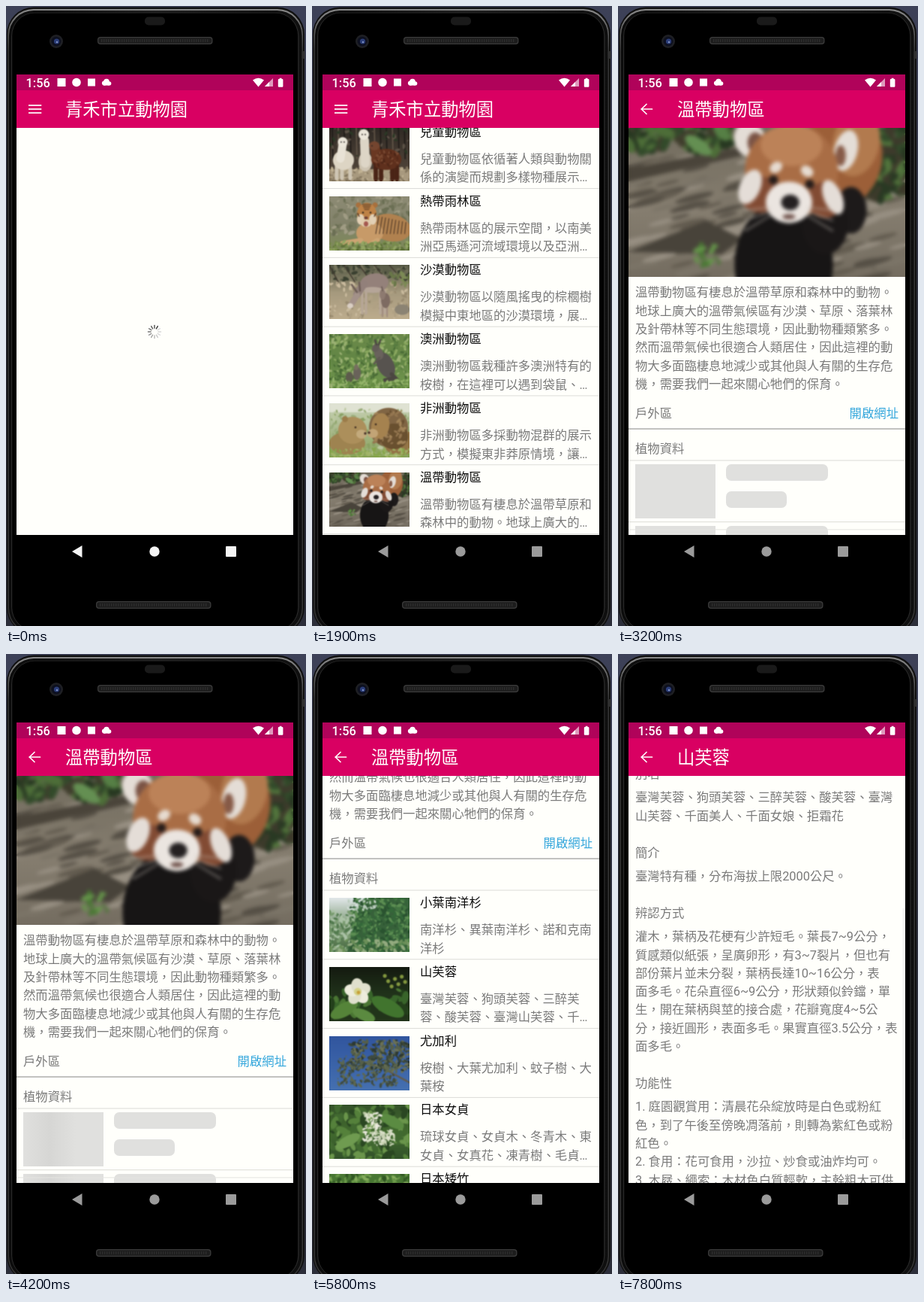
An HTML page with a canvas that plays this animation: 400 px wide and 824 px high, repeating every 7.9 s.

```html
<!DOCTYPE html>
<html lang="zh-Hant">
<head>
<meta charset="utf-8">
<style>
html, body { margin: 0; width: 100%; height: 100%; overflow: hidden; background: #000; }
canvas { display: block; width: 400px; height: 824px; }
</style>
</head>
<body>
<canvas id="stage"></canvas>
<script>
const W = 400, H = 824, LOOP = 7900, STEP = 100;
const FONT = 'Roboto, "Noto Sans CJK TC", "Noto Sans CJK", sans-serif';
const TOP = 162, BOTTOM = 703, LEFT = 14, RIGHT = 383;
const ROW = 91.8, SIZE = 16.35, LINE = 24.3;
const PAPER = '#fffffb', GREY = '#7a7a7a';

const stage = document.getElementById('stage');
const dpr = window.devicePixelRatio || 1;
stage.width = W * dpr;
stage.height = H * dpr;
const screen = stage.getContext('2d');
let g = screen;

// ---------- drawing helpers ----------
function rect(color, x, y, w, h) { g.fillStyle = color; g.fillRect(x, y, w, h); }
function round(color, x, y, w, h, r) {
  g.fillStyle = color;
  g.beginPath();
  g.roundRect(x, y, w, h, r);
  g.fill();
}
function oval(color, x, y, rx, ry = rx, turn = 0) {
  g.fillStyle = color;
  g.beginPath();
  g.ellipse(x, y, rx, ry, turn, 0, 7);
  g.fill();
}
function poly(color, ...p) {
  g.fillStyle = color;
  g.beginPath();
  for (let i = 0; i < p.length; i += 2) g.lineTo(p[i], p[i + 1]);
  g.fill();
}
function line(color, width, ...p) {
  g.strokeStyle = color;
  g.lineWidth = width;
  g.lineCap = 'round';
  g.beginPath();
  for (let i = 0; i < p.length; i += 2) g.lineTo(p[i], p[i + 1]);
  g.stroke();
}
function fade(x0, y0, x1, y1, ...colors) {
  const f = g.createLinearGradient(x0, y0, x1, y1);
  colors.forEach((c, i) => f.addColorStop(i / (colors.length - 1), c));
  return f;
}
// y is the middle of the glyph row
function text(s, x, y, color = GREY, size = SIZE, weight = 400, align = 'left') {
  g.font = `${weight} ${size}px ${FONT}`;
  g.fillStyle = color;
  g.textAlign = align;
  g.textBaseline = 'alphabetic';
  g.fillText(s, x, y + size * 0.37);
}

// ---------- pictures, 107 x 72 units ----------
const PW = 107, PH = 72;
function speckle(seed, n, colors, x, y, w, h, size, tilt = null) {
  let s = seed * 7919 + 17;
  const rnd = () => (s = (s * 16807) % 2147483647) / 2147483647;
  for (let i = 0; i < n; i++) {
    const px = x + rnd() * w, py = y + rnd() * h, r = size * (0.5 + rnd());
    const turn = rnd() * 3;
    oval(colors[i % colors.length], px, py, r, r * (tilt === null ? 0.5 : 0.16), tilt ?? turn);
  }
}
const back = (...colors) => rect(fade(0, 0, 0, PH, ...colors), 0, 0, PW, PH);
function legs(color, width, y0, y1, ...xs) { xs.forEach(x => line(color, width, x, y0, x, y1)); }

const photos = {
  monkeys() {
    back('#4b6240', '#576e4a', '#71894f');
    speckle(1, 220, ['#38502f', '#708a58', '#5d5d66', '#485f3c'], 0, 0, PW, 60, 3);
    speckle(26, 40, ['#8fa671', '#7d9760'], 50, 0, 57, 24, 3);
    poly('#2d2e33', 0, 62, 30, 58, 107, 56, 107, 70, 50, 72, 0, 70);
    poly('#55565a', 0, 62, 30, 58, 107, 56, 107, 59, 30, 61);
    oval('#807467', 37, 49, 9, 13, 0.4);
    oval('#948779', 30, 39, 6);
    line('#6e6258', 5, 33, 48, 24, 59);
    oval('#7a6d61', 80, 46, 14, 17, -0.35);
    oval('#94867a', 72, 32, 7);
    oval('#a88578', 69, 33, 3, 4);
    line('#64584f', 6, 72, 45, 64, 60);
    line('#64584f', 7, 86, 54, 90, 63);
  },
  alpacas() {
    back('#2f2924', '#453b32', '#54483c');
    for (let x = 4; x < PW; x += 8) line(x % 3 ? '#1e1a17' : '#635648', 1.6, x, 0, x + 1, 42);
    speckle(2, 50, ['#5c5146', '#2b3825'], 0, 0, PW, 40, 2.5);
    rect('#a8997e', 0, 56, PW, 16);
    speckle(3, 90, ['#c2b394', '#85775f'], 0, 54, PW, 18, 2.5);
    legs('#cfc6b4', 5, 46, 68, 10, 17, 28);
    oval('#ddd5c4', 19, 44, 14, 13);
    line('#e8e2d5', 11, 15, 42, 18, 23);
    oval('#ece6da', 18, 20, 6.5);
    oval('#cec4b2', 48, 46, 9, 13);
    line('#ddd5c6', 12, 48, 48, 47, 18);
    oval('#ece6da', 46, 10, 7);
    legs('#4a2416', 6, 48, 69, 62, 69, 84, 90);
    oval('#5f301d', 76, 43, 20, 14);
    line('#6a3822', 13, 63, 42, 61, 27);
    oval('#74452f', 60, 25, 7, 6);
    speckle(27, 40, ['#4d2617', '#7a4a32'], 60, 33, 32, 20, 2);
    [[16, 20], [20, 20], [44, 10], [48, 10], [57, 25]].forEach(p => oval('#292321', ...p, 0.9));
  },
  tiger() {
    back('#8d8b74', '#82826a', '#7d8a58');
    speckle(4, 130, ['#a09c84', '#6b6f54', '#797a60'], 0, 0, PW, 50, 3.5);
    oval('#b0814f', 82, 42, 27, 18, 0.2);
    oval('#c79a68', 54, 49, 18, 14);
    for (let i = 0; i < 9; i++) line('#4a3424', 1, 66 + i * 4.5, 27 + i, 62 + i * 4.8, 50);
    oval('#a8703d', 39, 12, 3.5);
    oval('#a8703d', 61, 12, 3.5);
    oval('#be8246', 50, 24, 13, 15);
    oval('#e2d0b5', 42, 31, 5, 7);
    oval('#e2d0b5', 58, 31, 5, 7);
    oval('#e0ccae', 49, 36, 7, 5);
    oval('#a4574e', 49, 37, 3, 3.5);
    oval('#6b3c34', 49, 29, 2.6, 1.8);
    oval('#28201a', 45, 22, 1.2);
    oval('#28201a', 55, 22, 1.2);
    for (let i = 0; i < 4; i++) line('#49301f', 0.9, 44 + i, 11 + i * 2.3, 56 - i, 11 + i * 2.3);
    for (const s of [-1, 1]) line('#40291d', 1.2, 50 + s * 12, 23, 50 + s * 10, 27);
    line('#cda473', 7, 42, 59, 18, 63);
    line('#cda473', 7, 64, 59, 56, 64);
    speckle(5, 130, ['#788c4c', '#93a663', '#5d7038'], 0, 61, PW, 11, 2.5);
  },
  donkey() {
    back('#565945', '#a5997d', '#bdac8d');
    speckle(6, 100, ['#3a4030', '#77765c', '#5b5d48'], 0, 0, PW, 20, 3);
    for (let i = 0; i < 5; i++) line('#40382e', 1.4, i * 20, 0, i * 22 + 12, 22);
    speckle(7, 110, ['#cabb9e', '#998b70', '#b0a184'], 0, 24, PW, 48, 3);
    speckle(28, 24, ['#7c8a55', '#697748'], 80, 10, 27, 16, 3);
    legs('#b7a797', 3.4, 34, 64, 44, 49, 68, 74);
    oval('#94817a', 60, 24, 19, 13, -0.15);
    oval('#b5a598', 58, 33, 13, 4);
    line('#92807a', 10, 46, 25, 37, 39);
    line('#a39189', 8, 37, 40, 29, 53);
    oval('#dacfc3', 28, 54, 4, 3.5);
    line('#6b5b54', 2.4, 37, 36, 30, 26);
    line('#6b5b54', 2.4, 41, 34, 40, 23);
    legs('#a18d80', 2.2, 50, 68, 71, 77);
    oval('#7e6b62', 75, 47, 6, 10);
    oval('#8d7a70', 71, 39, 4, 7);
    line('#6b5b54', 1.6, 71, 34, 70, 29);
    oval('#8b8373', 97, 59, 10, 7);
  },
  kangaroo() {
    back('#6c8a4a', '#618544', '#74994f');
    speckle(8, 420, ['#4a6c36', '#8aa85f', '#587c40', '#9cb274'], 0, 0, PW, PH, 2.6);
    oval('#57534f', 75, 41, 11, 18, -0.45);
    oval('#69625c', 66, 26, 6, 8, -0.3);
    oval('#635c57', 62, 18, 4.5, 6, 0.6);
    line('#4d4843', 2.4, 63, 14, 61, 8);
    line('#4d4843', 2.4, 66, 14, 68, 8);
    line('#4b4741', 5, 83, 53, 88, 58, 74, 61);
    line('#5e5851', 2.5, 67, 31, 60, 39);
    oval('#69625a', 37, 52, 5, 9);
    oval('#77705f', 36, 44, 3, 4);
    oval('#5d5b4c', 27, 57, 5, 7);
    speckle(9, 90, ['#658b42', '#94b56a'], 0, 60, PW, 12, 2.5);
  },
  lions() {
    back('#c9d2b8', '#a9b98b', '#86a156');
    rect('#dfe2d2', 0, 0, PW, 12);
    speckle(10, 160, ['#9bae7c', '#bcc8a0', '#8aa164'], 0, 8, PW, 62, 3);
    oval('#9e8350', 24, 53, 24, 15);
    oval('#937446', 94, 52, 22, 17);
    oval('#ac8f5b', 31, 36, 19, 18);
    oval('#9b7c4a', 21, 21, 4);
    oval('#c3aa7c', 43, 41, 7, 6);
    oval('#806544', 79, 32, 26, 26);
    oval('#69502f', 86, 44, 19, 17);
    speckle(29, 70, ['#947650', '#6b5132', '#a28459'], 60, 10, 40, 44, 3);
    oval('#a5824f', 68, 30, 12, 17, 0.2);
    oval('#c2a476', 58, 40, 7, 6);
    [[35, 32], [62, 28]].forEach(p => oval('#3c2b1f', ...p, 1.3));
    [[48, 40], [53, 39]].forEach(p => oval('#49342a', ...p, 1.7));
    speckle(11, 90, ['#86a64c', '#a1b468'], 0, 61, PW, 11, 2.5);
  },
  panda() {
    back('#6f695b', '#857d6f', '#6d665a');
    speckle(12, 200, ['#978f82', '#625b4f', '#7b7467', '#554f45'], 0, 14, PW, 58, 6, -0.25);
    poly('#4a443a', 0, 20, 42, 12, 44, 15, 0, 25);
    poly('#48433a', 0, 52, 30, 40, 44, 47, 36, 53);
    speckle(13, 90, ['#324a2a', '#4d6d38', '#273821', '#3f3d2c'], 0, 0, 40, 13, 3);
    speckle(14, 90, ['#324a2a', '#52743c', '#293923', '#3d3a2b'], 92, 4, 16, 28, 3);
    speckle(30, 16, ['#4a7834', '#65954a'], 26, 49, 9, 8, 1.8);
    oval('#648f52', 27, 11, 6, 2.6, 0.6);
    oval('#567f45', 36, 6, 4, 2.2, 0.8);
    oval('#9c5f38', 82, 16, 16, 19, 0.2);
    oval('#b27a4e', 88, 10, 9, 13, 0.2);
    oval('#1d1a1a', 86, 36, 6, 9);
    oval('#171515', 60, 57, 19, 24);
    oval('#1a1717', 76, 41, 9, 12);
    oval('#e4ddd6', 47, 9, 6, 7, -0.5);
    oval('#e4ddd6', 84, 13, 4.5, 8, 0.25);
    oval('#7a5345', 49, 10, 3, 4);
    oval('#865a47', 82, 15, 2, 4);
    oval('#a96d45', 63, 21, 18, 18);
    oval('#bc8258', 63, 11, 12, 8);
    oval('#824b33', 51, 30, 8, 7);
    oval('#824b33', 76, 32, 7, 7);
    oval('#e4ddd7', 47, 27, 4, 7, 0.4);
    oval('#e4ddd7', 79, 31, 3.5, 7, -0.4);
    oval('#ebe5e0', 62, 33, 9, 8);
    oval('#e6dbd0', 57, 19.5, 2.6, 2, -0.6);
    oval('#e6dbd0', 69, 21, 2.6, 2, 0.6);
    oval('#251c1a', 56, 24.3, 1.8);
    oval('#251c1a', 70, 26, 1.8);
    oval('#242021', 62.5, 33, 3.5, 3);
    oval('#6b4d46', 62, 38.5, 2.5, 1);
    for (const s of [-1, 1]) for (let i = 0; i < 3; i++)
      line('#cfc8c0', 0.3, 62 + s * 7, 35 + i * 1.5, 62 + s * 17, 36 + i * 4);
  },
  owl() {
    back('#7a8d62', '#647a4d', '#6a7f53');
    speckle(15, 240, ['#4a6537', '#93a272', '#728f52', '#b4bfa2'], 0, 0, PW, PH, 3.5);
    line('#5d4f3f', 4, 12, 0, 28, 72);
    line('#685b49', 3, 107, 10, 60, 64);
    oval('#a8a043', 73, 30, 7, 10);
    oval('#4f4840', 51, 46, 14, 25);
    oval('#5a5249', 51, 18, 13, 11);
    oval('#8f8577', 46, 20, 5, 6);
    oval('#8f8577', 57, 20, 5, 6);
    oval('#2a2522', 47, 19, 2);
    oval('#2a2522', 56, 19, 2);
    poly('#3d362e', 50, 21, 53, 21, 51.5, 26);
    for (let i = 0; i < 7; i++) line('#7c7266', 1, 42, 34 + i * 5, 60, 34 + i * 5);
  },
  pine() {
    back('#e2e8ea', '#7d9a76', '#47693f');
    speckle(16, 170, ['#527a4e', '#7a9c70', '#abc2a6'], 0, 18, 40, 54, 3);
    poly('#37613a', 50, 0, 107, 0, 107, 72, 24, 72, 36, 24);
    speckle(17, 420, ['#2a5330', '#437542', '#5c8e52', '#346839'], 30, 0, 77, 72, 2.8);
    speckle(31, 40, ['#d6e0dc', '#b9cbbb'], 24, 0, 40, 16, 2);
    speckle(18, 70, ['#94ab80', '#6c9059'], 0, 56, PW, 16, 3);
  },
  hibiscus() {
    back('#141a10', '#20321a', '#22351a');
    speckle(19, 40, ['#38642a', '#233f1b', '#4a7633'], 0, 28, PW, 44, 7);
    oval('#558439', 20, 57, 20, 9, -0.5);
    oval('#41742e', 78, 53, 24, 10, 0.5);
    oval('#5b8a40', 46, 64, 16, 7, 0.4);
    for (let i = 0; i < 5; i++) {
      const a = i * Math.PI * 0.4 - 0.4;
      oval(i % 2 ? '#edecdc' : '#e0e0cd', 38 + 8 * Math.cos(a), 33 + 8 * Math.sin(a), 10, 8, a);
    }
    oval('#d4d287', 38, 33, 5);
    oval('#c79f36', 39, 34, 2.4);
    for (let i = 0; i < 7; i++) oval('#84993f', 74 + i * 4.5, 12 + (i * 7) % 17, 2.6);
  },
  gum() {
    back('#31559e', '#3a62a8', '#4570b0');
    line('#625b4b', 2.4, 107, 62, 72, 43, 30, 30);
    line('#625b4b', 1.6, 72, 43, 55, 15);
    line('#625b4b', 1.6, 88, 52, 60, 58);
    speckle(20, 260, ['#3a4638', '#555f48', '#6b7155', '#2c3832'], 28, 6, 79, 40, 2.8);
    speckle(21, 170, ['#3f4b3f', '#5d674e'], 10, 26, 80, 40, 2.5);
  },
  privet() {
    back('#345229', '#426a2e', '#31512a');
    speckle(22, 130, ['#55813b', '#2a4722', '#6a954b', '#416930'], 0, 0, PW, PH, 6);
    oval('#6f9b50', 25, 48, 18, 7, -0.5);
    oval('#5b8b42', 84, 22, 17, 7, 0.5);
    speckle(23, 90, ['#dfe3cf', '#bfcca9', '#ecebdf'], 46, 10, 24, 38, 2.2);
    speckle(24, 70, ['#dfe3cf', '#c9d3b4'], 60, 34, 27, 20, 2.2);
  },
  bamboo() {
    back('#4c7a35', '#3c692b', '#4c7835');
    speckle(25, 360, ['#6d9b4a', '#315723', '#86ae5d', '#477632'], 0, 0, PW, PH, 3.5);
  }
};

const DETAIL = 3.45, cache = {};
for (const name in photos) {
  const c = cache[name] = document.createElement('canvas');
  c.width = Math.round(PW * DETAIL);
  c.height = Math.round(PH * DETAIL);
  g = c.getContext('2d');
  g.save();
  g.scale(DETAIL, DETAIL);
  photos[name]();
  g.restore();
  g.filter = 'blur(2.5px)';
  g.drawImage(c, 0, 0);
}
g = screen;

function banner(name, y, skip) {
  const c = cache[name];
  g.drawImage(c, 0, skip * DETAIL, c.width, 197.5, LEFT, y, RIGHT - LEFT, 197.5);
}

// ---------- content ----------
const zones = [
  ['monkeys', '臺灣動物區', '臺灣動物區以臺灣原生動物與棲', '息環境為展示重點，佈置模擬…'],
  ['alpacas', '兒童動物區', '兒童動物區依循著人類與動物關', '係的演變而規劃多樣物種展示…'],
  ['tiger', '熱帶雨林區', '熱帶雨林區的展示空間，以南美', '洲亞馬遜河流域環境以及亞洲…'],
  ['donkey', '沙漠動物區', '沙漠動物區以隨風搖曳的棕櫚樹', '模擬中東地區的沙漠環境，展…'],
  ['kangaroo', '澳洲動物區', '澳洲動物區栽種許多澳洲特有的', '桉樹，在這裡可以遇到袋鼠、…'],
  ['lions', '非洲動物區', '非洲動物區多採動物混群的展示', '方式，模擬東非莽原情境，讓…'],
  ['panda', '溫帶動物區', '溫帶動物區有棲息於溫帶草原和', '森林中的動物。地球上廣大的…'],
  ['owl', '鳥園區', '鳥園包括鳥類形態區、雉類與珍', '']
];
const plants = [
  ['pine', '小葉南洋杉', '南洋杉、異葉南洋杉、諾和克南', '洋杉'],
  ['hibiscus', '山芙蓉', '臺灣芙蓉、狗頭芙蓉、三醉芙', '蓉、酸芙蓉、臺灣山芙蓉、千…'],
  ['gum', '尤加利', '桉樹、大葉尤加利、蚊子樹、大', '葉桉'],
  ['privet', '日本女貞', '琉球女貞、女貞木、冬青木、東', '女貞、女真花、凍青樹、毛貞…'],
  ['bamboo', '日本矮竹', '', '']
];
const about = [
  '溫帶動物區有棲息於溫帶草原和森林中的動物。',
  '地球上廣大的溫帶氣候區有沙漠、草原、落葉林',
  '及針帶林等不同生態環境，因此動物種類繁多。',
  '然而溫帶氣候也很適合人類居住，因此這裡的動',
  '物大多面臨棲息地減少或其他與人有關的生存危',
  '機，需要我們一起來關心牠們的保育。'
];
const facts = [
  ['學名', 'Hibiscus taiwanensis'],
  ['別名', '臺灣芙蓉、狗頭芙蓉、三醉芙蓉、酸芙蓉、臺灣', '山芙蓉、千面美人、千面女娘、拒霜花'],
  ['簡介', '臺灣特有種，分布海拔上限2000公尺。'],
  ['辨認方式', '灌木，葉柄及花梗有少許短毛。葉長7~9公分，',
    '質感類似紙張，呈廣卵形，有3~7裂片，但也有',
    '部份葉片並未分裂，葉柄長達10~16公分，表',
    '面多毛。花朵直徑6~9公分，形狀類似鈴鐺，單',
    '生，開在葉柄與莖的接合處，花瓣寬度4~5公',
    '分，接近圓形，表面多毛。果實直徑3.5公分，表',
    '面多毛。'],
  ['功能性', '1. 庭園觀賞用：清晨花朵綻放時是白色或粉紅',
    '色，到了午後至傍晚凋落前，則轉為紫紅色或粉', '紅色。',
    '2. 食用：花可食用，沙拉、炒食或油炸均可。',
    '3. 木屐、繩索：木材色白質輕軟，主幹粗大可供']
];

// ---------- pages ----------
function ramp(t, from, to) {
  const p = Math.min(1, Math.max(0, (t - from) / (to - from)));
  return 1 - (1 - p) ** 2;
}
function rows(items, y) {
  items.forEach(([pic, name, a, b], i) => {
    const top = y + i * ROW;
    if (top > BOTTOM || top < TOP - ROW) return;
    g.drawImage(cache[pic], 23, top + 10, PW, PH);
    text(name, 144, top + 16, '#0c0c0c');
    text(a, 144, top + 52);
    text(b, 144, top + 76.5);
    rect('#dcdcd8', LEFT, top + 91.3, RIGHT - LEFT, 1);
  });
}
function spinner(t) {
  const head = 1 + Math.floor(t / STEP);
  for (let i = 0; i < 12; i++) {
    const a = (i * 30 - 90) * Math.PI / 180, age = (head - i + 120) % 12;
    const v = Math.min(215, 45 + age * 19);
    const c = Math.cos(a), s = Math.sin(a);
    line(`rgb(${v},${v},${v})`, 1.3, 198 + c * 4.8, 433 + s * 4.8, 198 + c * 8.6, 433 + s * 8.6);
  }
}
function skeleton(t, y) {
  const x = 23 + ((t - 4200) / 1000) * 260;
  for (let i = 0; i < 2; i++) {
    const top = y + i * 82;
    const tone = fade(x, 0, x + 70, 0, '#e0e0de', '#d6d6d4', '#e0e0de');
    rect(tone, 23, top + 5, PW, PH);
    round(tone, 144, top + 5, 136, 22, 7);
    round(tone, 144, top + 41, 81, 22, 7);
    rect('#dcdcd8', LEFT, top + 81.2, RIGHT - LEFT, 1);
  }
  rect('#e4e4e0', LEFT, y + 91.4, RIGHT - LEFT, 1);
}
function zonePage(t) {
  const y = TOP - 290 * ramp(t, 4800, 5500);
  banner('panda', y, 4.3);
  about.forEach((s, i) => text(s, 23, y + 218.3 + i * LINE));
  text('戶外區', 23, y + 379);
  text('開啟網址', 374, y + 379, '#35a7dc', SIZE, 400, 'right');
  rect('#c2c2c0', LEFT, y + 399, RIGHT - LEFT, 2);
  text('植物資料', 23, y + 426);
  rect('#dcdcd8', LEFT, y + 441.5, RIGHT - LEFT, 1);
  if (t < 4500) skeleton(t, y + 442);
  else rows(plants, y + 442);
}
function plantPage(t) {
  const scroll = 240 * ramp(t, 6200, 6800) + 70 * ramp(t, 7000, 7500);
  let y = TOP - scroll;
  banner('hibiscus', y, 7);
  y += 227;
  for (const [head, ...lines] of facts) {
    text(head, 23, y);
    lines.forEach((s, i) => text(s, 23, y + 31 + i * LINE));
    y += 31 + (lines.length - 1) * LINE + 49.3;
  }
  const view = BOTTOM - TOP, all = 953;
  if (t >= 6200) {
    g.globalAlpha = t < 7500 ? 1 : Math.max(0.12, 1 - (t - 7500) / 300);
    rect('#bdbdba', 379, TOP + scroll * view / all, 4, view * view / all);
    g.globalAlpha = 1;
  }
}

// ---------- device ----------
function speaker(x, y) {
  round('#3b3b3b', x, y, 153.5, 10, 4);
  round('#1d1d1d', x + 1.2, y + 1.3, 151, 7.4, 3);
  for (let i = 0; i < 48; i++) rect('#2d2d2d', x + 5 + i * 3, y + 3, 1.4, 4);
}
function device() {
  rect(fade(0, 0, 0, H, '#3d4158', '#2c2e3a', '#2c2e3a'), 0, 0, W, H);
  round('#101010', 1, 1.5, 397, 834, 36);
  round(fade(0, 3, 0, 60, '#8a8a8a', '#343434'), 2.5, 4, 393.5, 830, 34);
  round(fade(0, 0, W, 0, '#0b0b0b', '#202020', '#0e0e0e'), 4, 6, 390.5, 827, 33);
  round('#2a2a2a', 7, 9, 383.5, 821, 31);
  round('#000', 8.2, 9.5, 381, 820, 30);
  round('#303030', 394.5, 60, 4, 10, 1);
  round('#1a1a1a', 185, 14.5, 27, 11, 5);
  oval('#1e1f23', 67, 47, 9);
  oval('#0d1020', 67, 47, 6.3);
  oval('#2b3d78', 67.5, 47, 3.6);
  oval('#8294c4', 68, 48, 1.2);
  speaker(122, 41);
  speaker(120, 791);
}
function bars(t) {
  rect('#b0035a', LEFT, 91, RIGHT - LEFT, 21);
  rect('#d90062', LEFT, 112, RIGHT - LEFT, 50);
  const ink = '#fff';
  text('1:56', 26.5, 102, ink, 16.4, 500);
  rect(ink, 68.5, 96, 11, 11);
  oval(ink, 94, 101.5, 5.8);
  rect(ink, 109, 96.5, 10, 10);
  oval(ink, 131, 102.6, 3.1);
  oval(ink, 134, 100.6, 3.8);
  oval(ink, 137.6, 102.9, 2.7);
  rect(ink, 131, 102.5, 6.6, 3.1);
  g.fillStyle = ink;
  g.beginPath();
  g.moveTo(336.5, 107.5);
  g.lineTo(329, 98.5);
  g.quadraticCurveTo(336.5, 93, 344, 98.5);
  g.fill();
  poly('#df9bbd', 345, 107, 356, 96, 356, 107);
  poly(ink, 345, 107, 351, 101, 351, 107);
  round(ink, 362.8, 97, 6.6, 10.8, 1);
  rect(ink, 364.7, 95.8, 2.8, 2);

  if (t < 3200) {
    for (const y of [132, 137, 142]) rect(ink, 30, y - 0.8, 17.3, 1.7);
  } else {
    g.lineJoin = 'miter';
    line(ink, 1.7, 45.5, 137, 31.5, 137);
    line(ink, 1.7, 38, 130.5, 31.3, 137, 38, 143.5);
  }
  const title = t < 3200 ? '青禾市立動物園' : t < 6000 ? '溫帶動物區' : '山芙蓉';
  text(title, 79, 137.5, ink, 23.3);
}
function nav(t) {
  const ink = t < 900 ? '#f4f4f4' : '#9b9b9b';
  poly(ink, 88, 725, 101.5, 717, 101.5, 733);
  oval(ink, 198, 725, 6.7);
  round(ink, 293, 718, 14, 14, 1);
}

function draw(now) {
  const t = Math.floor((now % LOOP) / STEP) * STEP;
  g.setTransform(dpr, 0, 0, dpr, 0, 0);
  g.imageSmoothingQuality = 'high';
  device();
  g.save();
  g.beginPath();
  g.rect(LEFT, TOP, RIGHT - LEFT, BOTTOM - TOP);
  g.clip();
  rect(PAPER, LEFT, TOP, RIGHT - LEFT, BOTTOM - TOP);
  if (t < 900) spinner(t);
  else if (t < 3200) rows(zones, TOP - 153 * ramp(t, 1600, 2300));
  else if (t < 6000) zonePage(t);
  else plantPage(t);
  g.restore();
  bars(t);
  nav(t);
}

const start = performance.now();
function tick() {
  draw(performance.now() - start);
  requestAnimationFrame(tick);
}
tick();
</script>
</body>
</html>
```
